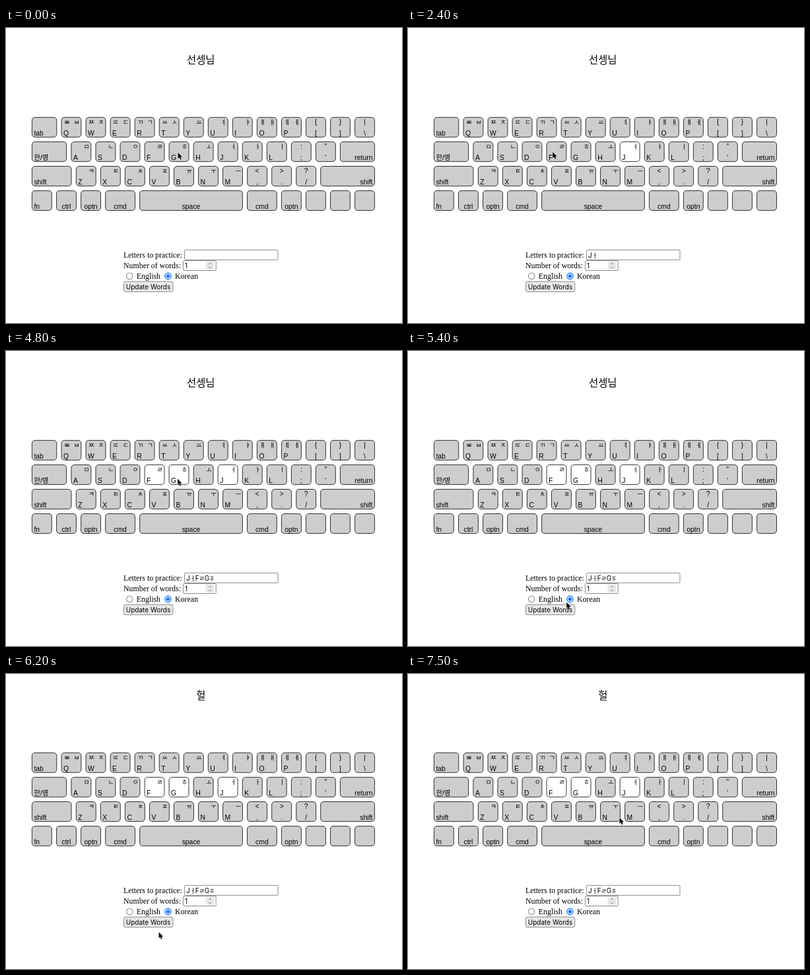
An HTML page for the animation above (8000 ms loop, 600 px wide and 447 px high).

```html
<!DOCTYPE html>
<html lang="ko">
<head>
<meta charset="utf-8">
<title>Typing practice</title>
<style>
html, body { margin: 0; width: 100%; height: 100%; overflow: hidden; background: #fff; }
svg { display: block; width: 600px; height: 447px; }
.word { font: 15.4px "Noto Sans CJK KR", "Noto Sans CJK", sans-serif; text-anchor: middle; }
.key { fill: #cdcdcd; stroke: #111; stroke-width: .85; }
.label { font: 10.4px "Liberation Sans", "Noto Sans CJK KR", sans-serif; }
.jamo { font: 500 9.6px "Noto Sans CJK KR", "Noto Sans CJK", sans-serif; text-anchor: middle; }
.form { font: 11.87px "Liberation Serif", serif; }
.ui { font: 10px Inter, "Noto Sans CJK KR", sans-serif; }
.ui .small { font-size: 8.7px; font-weight: 500; }
.box { fill: #fff; stroke: #8a8a8a; }
</style>
</head>
<body>
<svg viewBox="0 0 600 447">
  <g id="page">
    <text id="word" class="word" x="295.3" y="54.3"></text>
    <g id="keys"></g>
    <g class="form">
      <text x="178" y="347.7">Letters to practice:</text>
      <text x="178" y="363.7">Number of words:</text>
      <text x="197.8" y="379.7">English</text>
      <text x="256" y="379.7">Korean</text>
    </g>
    <rect class="box" x="270.5" y="336.3" width="141.5" height="15" rx="1"/>
    <text id="typed" class="ui" x="273" y="347.6"></text>
    <rect class="box" x="268.5" y="352.5" width="49.7" height="15" rx="1"/>
    <text class="ui" x="271" y="363.7">1</text>
    <rect x="302.5" y="353.8" width="13" height="12.4" rx="2.5" fill="#e9e9e9"/>
    <path d="M306.8 358.2l2.2-2.2 2.2 2.2M306.8 361.8l2.2 2.2 2.2-2.2" fill="none" stroke="#888"/>
    <circle class="box" cx="187.2" cy="376" r="4.7" stroke-width="1.1"/>
    <circle cx="245.5" cy="376" r="4.7" fill="#fff" stroke="#1a78ee" stroke-width="1.4"/>
    <circle cx="245.5" cy="376" r="2.8" fill="#1a78ee"/>
    <rect id="button" x="178.5" y="384.2" width="74.3" height="15.5" rx="2.5"/>
    <text class="ui" x="215.5" y="395.6" text-anchor="middle">Update Words</text>
  </g>
  <path id="cursor" d="M.3 .8V10L2.3 8.1 3.8 11.5 5.4 10.8 4 7.5H6.8Z" stroke="#fff" stroke-width=".9" paint-order="stroke"/>
</svg>
<script>
const $ = id => document.getElementById(id);
const LOOP = 8000, STEP = 100, UPDATE = 6200, PITCH = 37.05;
const rowY = row => 135.4 + row * PITCH;

function add(parent, tag, attrs, text = '') {
  const el = document.createElementNS('http://www.w3.org/2000/svg', tag);
  for (const k in attrs) el.setAttribute(k, attrs[k]);
  el.textContent = text;
  return parent.appendChild(el);
}

function key(x, row, width, label, anchor) {
  const y = rowY(row);
  const dx = { start: 3, middle: width / 2, end: width - 3 }[anchor];
  const rect = add($('keys'), 'rect', { class: 'key', x, y, width, height: 29.9, rx: 4.5 });
  add($('keys'), 'text', { class: 'label', x: x + dx, y: y + 27.3, 'text-anchor': anchor }, label);
  return rect;
}

// Each item: the lower label, then the upper symbols
const keyRects = {};
function charKeys(x, row, items) {
  items.split(' ').forEach((item, i) => {
    const [label, ...upper] = item;
    const left = x + i * PITCH, y = rowY(row);
    const isLetter = /[A-Z]/.test(label);
    keyRects[label] = key(left, row, 29.9, label, isLetter ? 'start' : 'middle');
    if (isLetter) {
      upper.reverse().forEach((c, j) =>
        add($('keys'), 'text', { class: 'jamo', x: left + 23.2 - j * 14.8, y: y + 10.7 }, c));
    } else {
      add($('keys'), 'text', { class: 'label', x: left + 15, y: y + 10.6, 'text-anchor': 'middle' }, upper[0]);
    }
  });
}

key(39.4, 0, 37.4, 'tab', 'start');
charKeys(84, 0, 'Qㅃㅂ Wㅉㅈ Eㄸㄷ Rㄲㄱ Tㅆㅅ Yㅛ Uㅕ Iㅑ Oㅒㅐ Pㅖㅔ [{ ]} \\|');
key(39.4, 1, 52.2, '한/영', 'start');
charKeys(98.9, 1, 'Aㅁ Sㄴ Dㅇ Fㄹ Gㅎ Hㅗ Jㅓ Kㅏ Lㅣ ;: \'"');
key(506.4, 1, 52.1, 'return', 'end');
key(39.4, 2, 59.6, 'shift', 'start');
charKeys(106.3, 2, 'Zㅋ Xㅌ Cㅊ Vㅍ Bㅠ Nㅜ Mㅡ ,< .> /?');
key(476.7, 2, 81.8, 'shift', 'end');
key(39.4, 3, 29.9, 'fn', 'start');
key(76.5, 3, 29.9, 'ctrl', 'middle');
key(113.6, 3, 29.9, 'optn', 'middle');
key(150.7, 3, 44.8, 'cmd', 'middle');
key(202.6, 3, 155.8, 'space', 'middle');
key(365.5, 3, 44.8, 'cmd', 'middle');
key(417.4, 3, 29.9, 'optn', 'middle');
for (const x of [454.5, 491.5, 528.6]) key(x, 3, 29.9, '', 'middle');

// Keys picked by clicking
const picks = [['J', 'ㅓ', 2000], ['F', 'ㄹ', 2900], ['G', 'ㅎ', 3800]].map(([letter, jamo, at]) => {
  const span = add($('typed'), 'tspan', {}, letter);
  add(span, 'tspan', { class: 'small' }, jamo);
  return { rect: keyRects[letter], span, at };
});

// Cursor moves: start, number of steps, then two control points and the end
const home = [260.3, 188];
const moves = [
  [200, 1, [260, 188], [260, 188], [260, 187.6]],
  [900, 7, [195, 444], [220, 444], [334, 185]],
  [2000, 6, [280, 188], [193, 188], [224, 187]],
  [3100, 3, [236, 187], [248, 187], [259.6, 188]],
  [4800, 7, [253, 212], [388, 340], [240, 380]],
  [5600, 5, [240, 398], [232, 400], [231.3, 390.5]],
  [6500, 5, [231, 365], [236, 350], [233, 374]],
  [7100, 5, [255, 250], [330, 60], [320.3, 217]],
];

function cursorAt(t) {
  let pos = home;
  for (const [start, steps, c1, c2, end] of moves) {
    if (t < start) break;
    const p = Math.min(1, (Math.floor((t - start) / STEP) + 1) / steps);
    const u = p * p * (3 - 2 * p), v = 1 - u, from = pos;
    pos = end.map((e, i) =>
      v * v * v * from[i] + 3 * v * v * u * c1[i] + 3 * v * u * u * c2[i] + u * u * u * e);
  }
  return pos;
}

function draw(t) {
  const [x, y] = cursorAt(t);
  const updated = t >= UPDATE, shift = updated ? -16 : 0;
  $('cursor').setAttribute('transform', `translate(${x} ${y})`);
  $('page').setAttribute('transform', `translate(0 ${shift})`);
  $('word').textContent = updated ? '헐' : '선셍님';
  for (const { rect, span, at } of picks) {
    rect.style.fill = t >= at ? '#fff' : '';
    span.style.display = t >= at ? '' : 'none';
  }
  const hover = x > 178 && x < 253 && y > 384 + shift && y < 400 + shift;
  const pressed = t >= 5900 && t < UPDATE;
  const [fill, stroke] = pressed ? ['#a9a9a9', '#666']
    : hover ? ['#d6d6d6', '#707070'] : ['#e8e8e8', '#8a8a8a'];
  $('button').setAttribute('fill', fill);
  $('button').setAttribute('stroke', stroke);
}

const began = performance.now();
function tick() {
  draw((performance.now() - began) % LOOP);
  requestAnimationFrame(tick);
}
tick();
</script>
</body>
</html>
```
